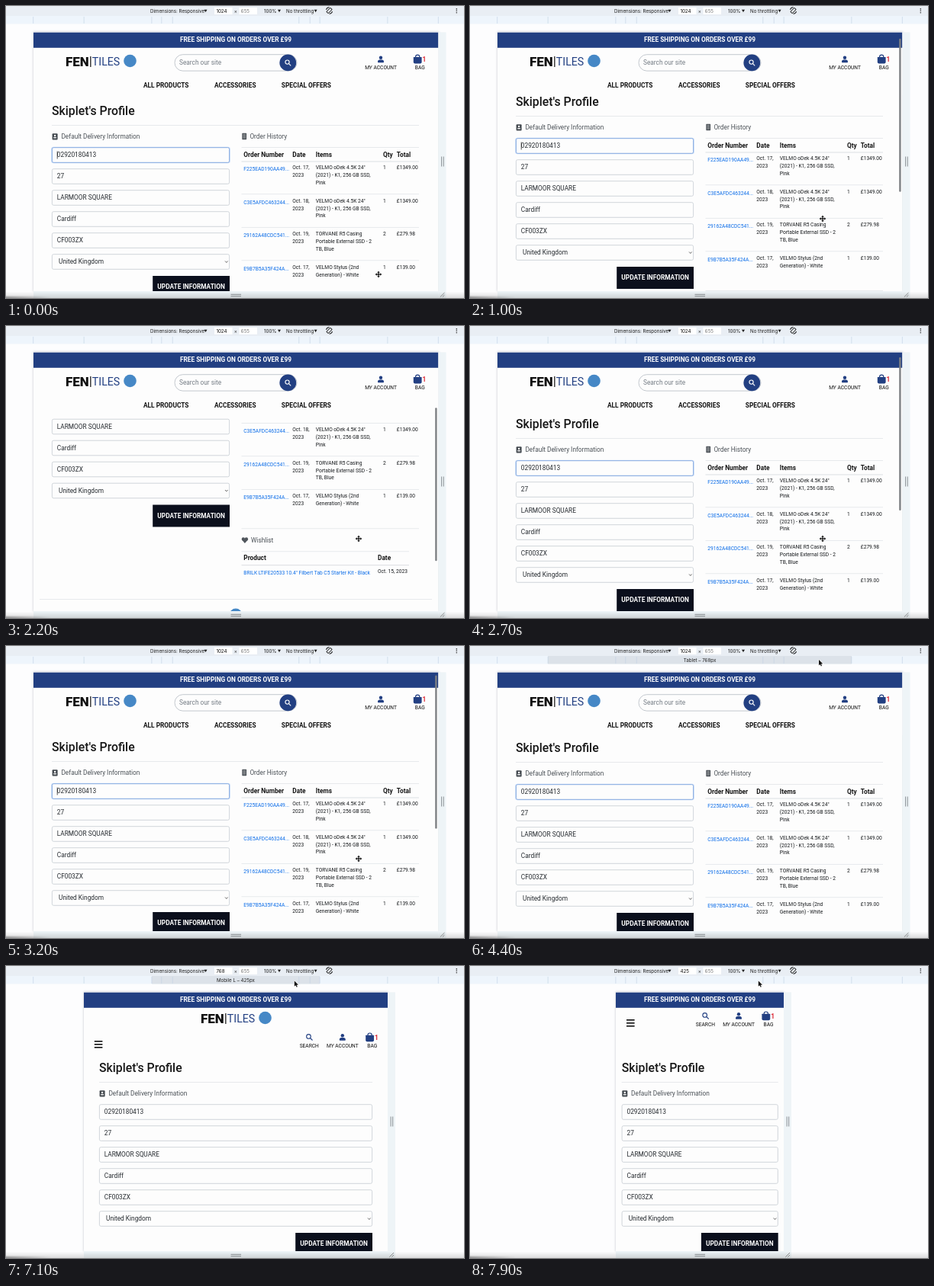
An HTML page with a canvas that plays this animation: 600 by 383 pixels, repeating every 8 s.

```html
<!DOCTYPE html>
<html lang="en">
<head>
<meta charset="utf-8">
<title>Responsive profile page</title>
<style>
html, body { margin: 0; width: 100%; height: 100%; overflow: hidden; background: #fdfdfe; }
canvas { display: block; width: 600px; height: 383px; }
</style>
</head>
<body>
<canvas id="stage"></canvas>
<script>
const W = 600, H = 383, LOOP = 8000, STEP = 100;
const TOP = 34.4, BOTTOM = 374, HEADER = 117;
const NAVY = '#223f82', LINK = '#0a6ce8', LINE = '#dee2e6', INK = '#16191c';
const canvas = document.getElementById('stage');
const dpr = window.devicePixelRatio || 1;
canvas.width = W * dpr;
canvas.height = H * dpr;
const ctx = canvas.getContext('2d');

// Keys are [time, value, value...]
const SCROLL = [[0, -4], [300, -3], [600, 0], [900, 0], [1100, 16], [1400, 56], [1600, 88],
  [1800, 108], [2000, 115.5], [2250, 115.5], [2450, 65], [2700, 5], [2900, 2], [3200, 1], [3500, 0]];
const POINTER = [[0, 488, 352], [300, 488, 352], [800, 462, 279], [3700, 462, 279], [4000, 466, 190],
  [4300, 458, 26], [4400, 457, 18], [5500, 457, 18], [6000, 420.4, 18.6], [6400, 420.4, 18.6], [7100, 377.8, 19.4]];

const LAYOUTS = {
  1024: { x0: 36, x1: 566.5, left: 60, right: 293, rule: 541 },
  768: { x0: 102, x1: 500, left: 122, right: 480, rule: 480 },
  425: { x0: 191, x1: 411, left: 198.7, right: 403.7, rule: 403.7 }
};
const FIELDS = ['02920180413', '27', 'LARMOOR SQUARE', 'Cardiff', 'CF003ZX'];
const DESK = ['VELMO oDek 4.5K 24"', '(2021) - K1, 256 GB SSD,', 'Pink'];
const ORDERS = [
  ['F225EAD190AA49...', 17, DESK, '1', '£1349.00'],
  ['C3E5AFDC463244...', 18, DESK, '1', '£1349.00'],
  ['29162A48CDC541...', 19, ['TORVANE R5 Casing', 'Portable External SSD - 2', 'TB, Blue'], '2', '£279.98'],
  ['E9B7B5A35F424A...', 17, ['VELMO Stylus (2nd', 'Generation) - White'], '1', '£139.00']
];

function track(keys, t, i = 1) {
  let k = 0;
  while (k < keys.length - 1 && keys[k + 1][0] <= t) k++;
  const a = keys[k], b = keys[k + 1];
  return b ? a[i] + (b[i] - a[i]) * (t - a[0]) / (b[0] - a[0]) : a[i];
}

function text(s, x, y, size = 8.3, color = INK, weight = 400, align = 'left', face = 'Roboto') {
  ctx.font = `${weight} ${size}px ${face}, sans-serif`;
  ctx.textAlign = align;
  ctx.textBaseline = 'alphabetic';
  ctx.fillStyle = color;
  ctx.fillText(s, x, y + size * 0.355);
}

function rect(x, y, w, h, color) {
  ctx.fillStyle = color;
  ctx.fillRect(x, y, w, h);
}

function box(x, y, w, h, r, fill, stroke, width = 0.8) {
  ctx.beginPath();
  ctx.roundRect(x, y, w, h, r);
  if (fill) { ctx.fillStyle = fill; ctx.fill(); }
  if (stroke) { ctx.strokeStyle = stroke; ctx.lineWidth = width; ctx.stroke(); }
}

function disc(x, y, r, color) {
  ctx.beginPath();
  ctx.arc(x, y, r, 0, 7);
  ctx.fillStyle = color;
  ctx.fill();
}

function poly(points, color, close = true, width = 1) {
  ctx.beginPath();
  for (let i = 0; i < points.length; i += 2) ctx.lineTo(points[i], points[i + 1]);
  if (close) { ctx.closePath(); ctx.fillStyle = color; ctx.fill(); }
  else { ctx.strokeStyle = color; ctx.lineWidth = width; ctx.stroke(); }
}

const hline = (x0, x1, y, color = LINE) => rect(x0, y - 0.35, x1 - x0, 0.7, color);
const caretDown = x => poly([x - 2, 4.8, x + 2, 4.8, x, 8.3], '#222');

function lens(x, y, r, color, width) {
  ctx.beginPath();
  ctx.arc(x - r * 0.3, y - r * 0.3, r, 0, 7);
  ctx.strokeStyle = color;
  ctx.lineWidth = width;
  ctx.stroke();
  poly([x + r * 0.4, y + r * 0.4, x + r * 1.5, y + r * 1.5], color, false, width);
}

function person(x, y) {
  disc(x, y - 2.1, 2.2, NAVY);
  box(x - 4, y + 0.8, 8, 3.6, [2.6, 2.6, 0.8, 0.8], NAVY);
}

function bag(x, y) {
  box(x - 2.6, y - 5.6, 5.2, 6, 2.6, null, NAVY, 1.2);
  box(x - 5.4, y - 2.8, 10.8, 8.4, [0.5, 0.5, 2, 2], NAVY);
  text('1', x + 6.4, y, 8.3, '#dc2430', 700);
}

function burger(x, y) {
  for (let i = -1; i < 2; i++) rect(x, y + i * 4 - 0.8, 10.6, 1.6, '#111');
}

function logo(x, y) {
  text('FEN', x, y, 17, '#111', 900);
  const bar = x + ctx.measureText('FEN').width + 1.5;
  rect(bar, y - 6.5, 1.2, 14, '#111');
  text('TILES', bar + 2.6, y + 0.2, 14.2, NAVY);
  disc(x + 84.5, y - 0.5, 8.3, '#4688c6');
}

function label(s, x, y) { text(s, x, y, 6.64, '#0c0c0c', 400, 'center'); }

function header(width, L) {
  rect(L.x0, TOP, L.x1 - L.x0, HEADER - TOP, '#fdfdfd');
  rect(L.x0, TOP, L.x1 - L.x0, 20.4, NAVY);
  text('FREE SHIPPING ON ORDERS OVER £99', 301, 44.5, 8.3, '#fff', 700, 'center');
  if (width === 1024) {
    logo(78, 72.5);
    box(221, 63.7, 160, 21.4, 10.7, '#fdfdfd', '#b4bac2');
    text('Search our site', 227, 74, 8.3, '#747c84');
    disc(369.3, 74.4, 10.9, NAVY);
    lens(369.3, 74.4, 2.6, '#fff', 1.1);
    person(491, 69.8);
    label('MY ACCOUNT', 491, 80.8);
    bag(539.2, 69.8);
    label('BAG', 542.3, 80.8);
    text('ALL PRODUCTS', 209.7, 104, 8.3, '#111', 700, 'center');
    text('ACCESSORIES', 300.3, 104, 8.3, '#111', 700, 'center');
    text('SPECIAL OFFERS', 393.4, 104, 8.3, '#111', 700, 'center');
    return;
  }
  const wide = width === 768, y = wide ? 93.3 : 65.3, shift = wide ? 0 : -88.8;
  if (wide) logo(255, 68.5);
  burger(wide ? 115.8 : 205, y + 9.5);
  lens(397.3 + shift, y, 2.8, NAVY, 1.1);
  label('SEARCH', 397.2 + shift, y + 11.4);
  person(440.8 + shift, y);
  label('MY ACCOUNT', 440.8 + shift, y + 11.4);
  bag(476.6 + shift, y + 0.3);
  label('BAG', 479.8 + shift, y + 11.4);
}

function form(L, focused, blink) {
  const { left: x, right: r } = L;
  text("Skiplet's Profile", x, 133.3, 15.8, '#161616', 500);
  hline(x, L.rule, 152.5);
  box(x + 0.6, 163.2, 7, 8.2, 1, '#444a50');
  disc(x + 4.1, 166, 1.2, '#fdfdfd');
  rect(x + 2.3, 168, 3.6, 1.4, '#fdfdfd');
  text('Default Delivery Information', x + 12.4, 167, 8.3, '#4a5056');
  for (let i = 0; i < 6; i++) {
    const y = 181.7 + i * 28, hot = focused && i === 0;
    if (hot) box(x, y, r - x, 19.6, 2, null, 'rgba(90,150,240,.25)', 2);
    box(x + 0.4, y, r - x - 0.8, 19.6, 2, '#fdfdfd', hot ? '#6d97d8' : '#c6ccd2');
    text(i < 5 ? FIELDS[i] : 'United Kingdom', x + (i < 5 ? 6.8 : 9), y + 9.7, 8.3, '#24292e');
  }
  poly([r - 6, 330.5, r - 4.2, 332.5, r - 2.4, 330.5], '#444', false, 0.8);
  if (focused && blink) rect(x + 6.8, 186.5, 0.7, 10, '#111');
  rect(r - 100.8, 350, 100.8, 29, '#0b0f1c');
  text('UPDATE INFORMATION', r - 50.4, 364.5, 8.3, '#fff', 700, 'center');
}

function orders() {
  box(309.3, 162.8, 5.8, 8.4, 0.6, '#50565c');
  for (let i = 0; i < 3; i++) rect(310.5, 164.6 + i * 2, 3.4, 0.6, '#ddd');
  text('Order History', 319.4, 167, 8.3, '#4a5056');
  hline(308.5, 541, 181.5);
  const heads = { 'Order Number': 311.3, Date: 375.3, Items: 405.8, Qty: 494, Total: 511.8 };
  for (const h in heads) text(h, heads[h], 190.7, 8.3, '#161616', 700);
  hline(308.5, 541, 200, '#ccd1d6');
  ORDERS.forEach(([id, day, lines, qty, total], i) => {
    const y = 208 + i * 43.5, small = 6.64;
    if (i) hline(308.5, 541, y - 8.7);
    text(id, 311.3, y + 1.9, small, LINK);
    text(`Oct. ${day},`, 375.3, y, small);
    text('2023', 375.3, y + 9.8, small);
    lines.forEach((s, n) => text(s, 405.8, y + n * 9.8, small));
    text(qty, 494, y, small);
    text(total, 511.8, y, small);
  });
}

function wishlist() {
  hline(308.5, 541, 381.3);
  disc(310.9, 394.9, 2.2, '#50565c');
  disc(314.9, 394.9, 2.2, '#50565c');
  poly([308.8, 395.8, 317, 395.8, 312.9, 400.4], '#50565c');
  text('Wishlist', 321, 396.3, 8.3, '#4a5056');
  hline(308.5, 528, 411.3);
  text('Product', 311.3, 419.9, 8.3, '#161616', 700);
  text('Date', 487, 419.9, 8.3, '#161616', 700);
  hline(308.5, 528, 429.3, '#ccd1d6');
  text('BRILK LTIFE20533 10.4" Filbert Tab C5 Starter Kit - Black', 311.3, 439, 6.64, LINK);
  text('Oct. 15, 2023', 487, 437.2, 6.64);
  hline(44, 558, 474);
  disc(301, 494.3, 8.3, '#4688c6');
}

function toolText(s, x, y = 6.4, color = '#1c1c1c', align = 'left') {
  text(s, x, y, 6.2, color, 400, align, 'Inter');
}

function toolbar(width, hover) {
  rect(0, 0, W, 13, '#e9eef4');
  rect(0, 13, W, 10.5, '#eef5fc');
  if (hover) {
    const L = LAYOUTS[hover];
    rect(L.x0, 13, L.x1 - L.x0, 10.5, '#dce2e9');
  }
  for (const w of [1024, 768, 425, 375, 320]) {
    const half = w * 0.259;
    for (const x of [301 - half, 301 + half]) rect(x - 0.3, 14, 0.6, 9, '#c0d0e2');
  }
  if (hover) {
    const name = hover === 768 ? 'Tablet' : 'Mobile L';
    toolText(`${name} – ${hover}px`, 301, 18.3, '#222', 'center');
  }
  toolText('Dimensions: Responsive', 189);
  caretDown(261.5);
  rect(273, 2, 23.5, 9, '#fff');
  toolText(String(width), 275.4, 6.4, '#0c0c0c');
  toolText('×', 300.8, 6.4, '#333', 'center');
  rect(305.5, 2, 23.5, 9, '#fff');
  toolText('655', 307.8, 6.4, '#777');
  toolText('100%', 338);
  caretDown(358);
  toolText('No throttling', 367);
  caretDown(405.6);
  ctx.save();
  ctx.translate(423.5, 6);
  ctx.rotate(Math.PI / 4);
  box(-1.6, -3.6, 3.2, 7.2, 0.6, null, '#222', 1);
  for (const a of [-0.5, Math.PI - 0.5]) {
    ctx.beginPath();
    ctx.arc(0, 0, 4.2, a, a + 1.3);
    ctx.stroke();
  }
  ctx.restore();
  for (let i = -1; i < 2; i++) disc(590.3, 6.3 + i * 2.4, 0.8, '#333');
}

function handles(L) {
  const x = L.x1;
  rect(x, TOP, 10, H - TOP, '#eef4f7');
  rect(L.x0, BOTTOM, x - L.x0, H - BOTTOM, '#eef4f7');
  rect(x + 3.6, 197.5, 1, 13, '#8b9196');
  rect(x + 6.2, 197.5, 1, 13, '#8b9196');
  rect(294.5, 377.8, 13.5, 1, '#8b9196');
  rect(294.5, 380.2, 13.5, 1, '#8b9196');
  poly([x + 2.4, 381.6, x + 8, 376], '#777', false, 0.8);
  poly([x + 5.4, 381.6, x + 8, 379], '#777', false, 0.8);
}

// Soft shade along the lower edge, deeper at the left
function shade() {
  const side = ctx.createLinearGradient(0, 0, 60, 0);
  side.addColorStop(0, 'rgba(0,0,0,.12)');
  side.addColorStop(1, 'rgba(0,0,0,0)');
  for (let i = 0; i < 8; i++) {
    const y = 375 + i;
    rect(0, y, W, H - y, 'rgba(0,0,0,.014)');
    if (i > 4) rect(0, y, 60, H - y, side);
  }
}

function pointer(x, y, cross) {
  ctx.save();
  ctx.translate(x, y);
  if (cross) {
    for (let i = 0; i < 4; i++) {
      rect(-0.6, -3, 1.2, 3.2, '#111');
      poly([-1.8, -2.2, 1.8, -2.2, 0, -4.3], '#111');
      ctx.rotate(Math.PI / 2);
    }
  } else {
    const arrow = [0, 0, 0, 7.4, 1.7, 5.9, 2.8, 8.4, 4, 7.9, 2.9, 5.4, 5.2, 5.3];
    poly([...arrow, 0, 0], '#fff', false, 1.2);
    poly(arrow, '#111');
  }
  ctx.restore();
}

function draw(now) {
  const t = Math.floor((now % LOOP) / STEP) * STEP;
  const width = t < 5000 ? 1024 : t < 7500 ? 768 : 425;
  const L = LAYOUTS[width], scroll = width === 1024 ? track(SCROLL, t) : 0;
  const px = track(POINTER, t), py = track(POINTER, t, 2);
  const still = (t >= 5000 && t < 5600) || t >= 7500;
  const hover = t < 4300 || still ? 0 : px < 411 ? 425 : 768;

  ctx.setTransform(dpr, 0, 0, dpr, 0, 0);
  rect(0, 0, W, H, '#fdfdfe');
  toolbar(width, hover);

  ctx.save();
  ctx.shadowColor = 'rgba(60,70,90,.3)';
  ctx.shadowBlur = 3 * dpr;
  rect(L.x0, TOP, L.x1 - L.x0, BOTTOM - TOP, '#fdfdfd');
  ctx.restore();

  ctx.save();
  ctx.beginPath();
  ctx.rect(L.x0, TOP, L.x1 - L.x0, BOTTOM - TOP);
  ctx.clip();
  ctx.translate(0, -scroll);
  form(L, width === 1024, (t + 200) % 1000 < 500);
  if (width === 1024) { orders(); wishlist(); }
  ctx.translate(0, scroll);
  header(width, L);
  if (t >= 800 && t < 3900) {
    ctx.globalAlpha = Math.min(1, (3900 - t) / 300);
    box(562.2, 38 + Math.max(0, scroll) * 0.6, 2.4, 201, 1.2, '#7d8084');
  }
  ctx.restore();

  handles(L);
  shade();
  pointer(px, py, t < 4200);
}

const start = performance.now();
function frame() {
  draw(performance.now() - start);
  requestAnimationFrame(frame);
}
frame();
</script>
</body>
</html>
```
